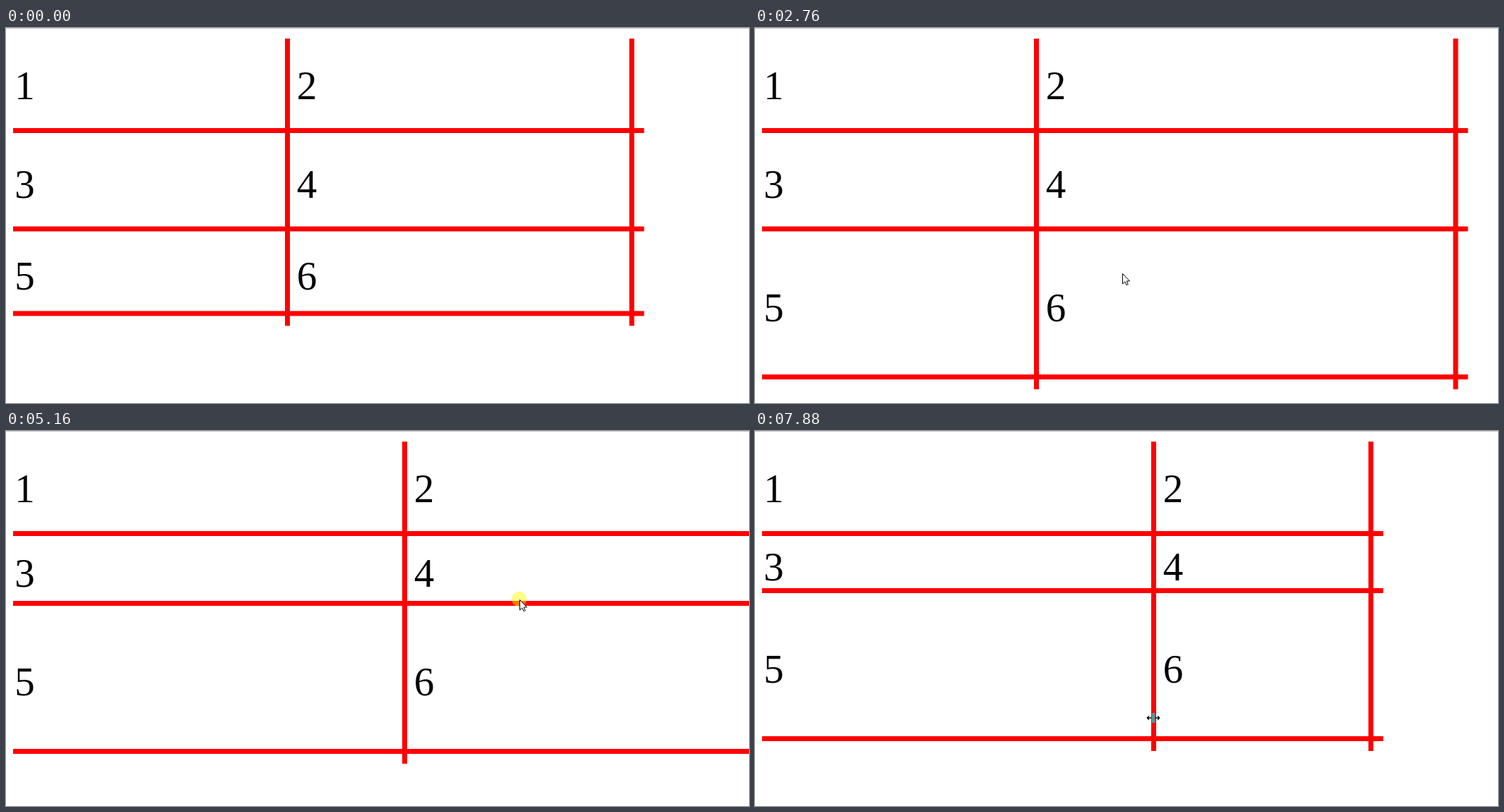
An HTML page for the animation above (8 s loop, 1052 px wide and 532 px high).

```html
<!DOCTYPE html>
<html lang="en">
<head>
<meta charset="utf-8">
<title>Resizable table</title>
<style>
  html, body { margin: 0; width: 100%; height: 100%; overflow: hidden; background: #fff; }
  svg { display: block; width: 1052px; height: 532px; }
  text { font: 57px "Liberation Serif", "Times New Roman", serif; }
  .line { fill: #f00; }
  .arrow { fill: #fff; stroke: #000; stroke-linejoin: round; }
  .resize path { fill: none; stroke: #000; stroke-width: 1.3; }
  .resize rect { fill: #4f9d9d; }
</style>
</head>
<body>
<svg viewBox="0 0 1052 532">
  <rect width="1052" height="1" fill="#c8c8c8"/>
  <g id="table"></g>
  <g id="pointer">
    <circle id="press" cx="-0.5" cy="-0.5" r="10.7" fill="#ff0" fill-opacity=".47"/>
    <path class="arrow" id="arrow" d="M.5 .5V15L3.9 11.9L6 16.6L8.2 15.6L6.2 11H10.5Z"/>
    <g class="resize" id="resize">
      <rect x="-2" y="-7" width="4" height="14"/>
      <path d="M-3 0H-8.5M-6 -2.7L-8.7 0L-6 2.7M3 0H8.5M6 -2.7L8.7 0L6 2.7"/>
    </g>
  </g>
</svg>
<script>
const LOOP = 8000, STEP = 40, LINE = 7, HALF = LINE / 2, GAP = 7, TAIL = 14;
const LEFT = 10, TOP = 15, ROW1 = 145.5;
const base = { row2: 285, row3: 120, col1: 398.5, col2: 487.5 }; // row3 and col2 are sizes

const smooth = u => u * u * u * (10 - 15 * u + 6 * u * u);
const easeOut = u => 1 - (1 - u) ** 3;

// The pointer's moves; a drag also moves the line it holds
const moves = [];
let spot = { x: 976, y: 545 };

function go(start, length, x, y, extra) {
  const to = { x, y };
  moves.push({ start, length, from: spot, to, ease: smooth, ...extra });
  spot = to;
}
function drag(line, press, start, length, delta, ease = smooth) {
  const axis = line.startsWith("row") ? "y" : "x";
  const { x, y } = { ...spot, [axis]: spot[axis] + delta };
  go(start, length, x, y, { line, press, delta, ease });
}

go(200, 600, 871, 406);
drag("row3", 1040, 1120, 360, 90);
go(1560, 200, 883, 453);
drag("col2", 2000, 2080, 360, 106);
go(2480, 320, 512, 346);
go(2840, 320, 397, 394);
drag("col1", 3440, 3680, 360, 166);
go(4080, 200, 723, 267);
go(4280, 160, 727, 288.5);
drag("row2", 4640, 4880, 395, -58.5);
go(5320, 280, 1157.5, 304);
drag("col2", 6440, 6530, 645, -286, easeOut);
go(7180, 300, 631, 404);
go(7480, 240, 563.5, 406.5);
drag("col1", LOOP, LOOP, 1, 0);

const progress = (m, t) => m.ease(Math.min(1, Math.max(0, (t - m.start) / m.length)));

function pointer(t) {
  const m = moves.filter(m => m.start <= t).pop() || moves[0];
  const u = progress(m, t);
  const at = k => Math.round(m.from[k] + u * (m.to[k] - m.from[k]));
  return { x: at("x"), y: at("y") };
}

// Lines trail the pointer by one step
function place(line, t) {
  const held = moves.filter(m => m.line === line);
  const value = held.reduce((sum, m) => sum + m.delta * progress(m, t - STEP), base[line]);
  return Math.round(value * 2) / 2;
}

// A resting pointer about to drag shows the resize shape
function hovered(t) {
  const i = moves.findIndex(m => m.start > t);
  const next = moves[i], last = moves[i - 1];
  return next.line && last && t >= last.start + last.length ? next.line : "";
}

const byId = id => document.getElementById(id);
function set(el, attrs) {
  for (const name in attrs) el.setAttribute(name, attrs[name]);
}
function add(tag, attrs, text = "") {
  const el = document.createElementNS("http://www.w3.org/2000/svg", tag);
  set(el, attrs);
  el.textContent = text;
  return byId("table").appendChild(el);
}
function show(id, visible) {
  byId(id).style.display = visible ? "inline" : "none";
}

const digits = [1, 2, 3, 4, 5, 6].map(n => add("text", {}, n));
const across = [0, 1, 2].map(() => add("rect", { class: "line", x: LEFT, height: LINE }));
const down = [0, 1].map(() => add("rect", { class: "line", y: TOP, width: LINE }));

function draw(t) {
  const y2 = place("row2", t);
  const rows = [ROW1, y2, y2 + place("row3", t)];
  const x1 = place("col1", t);
  const cols = [x1, x1 + place("col2", t)];

  // Row lines reach the column edge one step later still
  const right = place("col1", t - STEP) + place("col2", t - STEP) + HALF + TAIL;

  rows.forEach((y, r) => {
    set(across[r], { y: y - HALF, width: right - LEFT });
    const top = r ? rows[r - 1] + HALF + GAP : TOP;
    const baseline = (top + y + HALF) / 2 + 18.8;
    set(digits[2 * r], { x: 12.3, y: baseline });
    set(digits[2 * r + 1], { x: x1 + 13.2, y: baseline });
  });
  cols.forEach((x, c) => set(down[c], { x: x - HALF, height: rows[2] + HALF + TAIL - TOP }));

  const { x, y } = pointer(t);
  const hover = hovered(t);
  set(byId("pointer"), { transform: `translate(${x} ${y})` });
  set(byId("resize"), { transform: `rotate(${hover.startsWith("row") ? 90 : 0})` });
  show("resize", hover);
  show("arrow", !hover);
  show("press", moves.some(m => t >= m.press && t < m.start + m.length + STEP));
}

const start = performance.now();
function tick() {
  const t = Math.max(0, performance.now() - start) % LOOP;
  draw(Math.floor(t / STEP) * STEP);
  requestAnimationFrame(tick);
}
tick();
</script>
</body>
</html>
```
